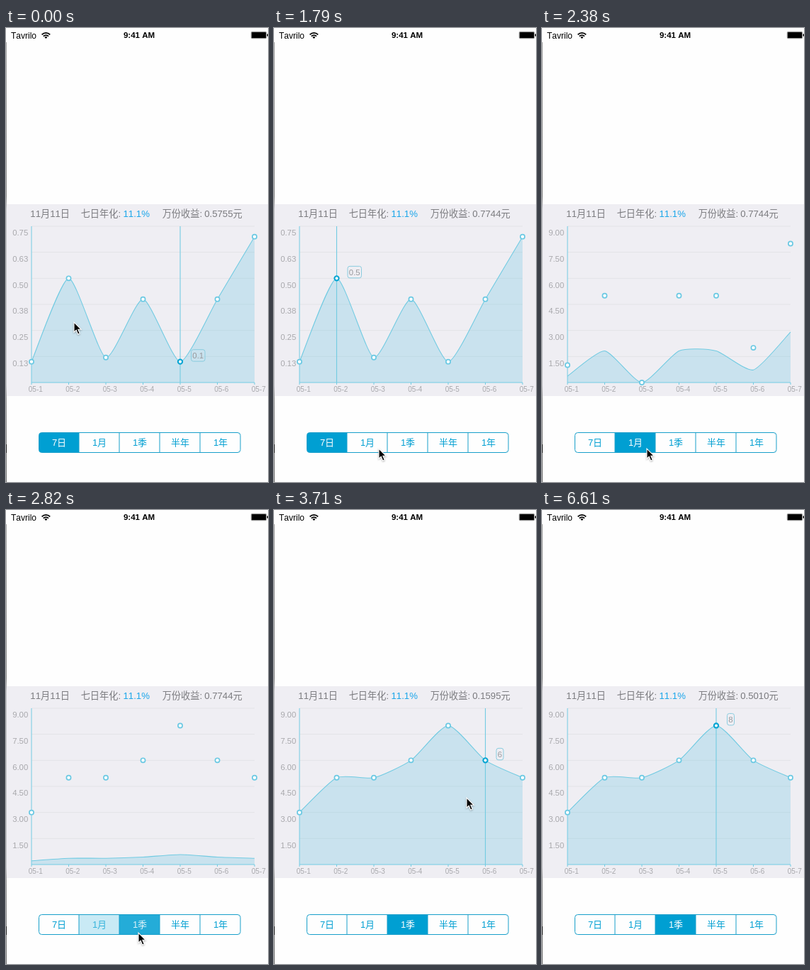
These frames come from a looping animation (370 by 639 pixels, 6670 ms). An HTML page:

```html
<!DOCTYPE html>
<html lang="zh">
<head>
<meta charset="utf-8">
<title>Yield chart</title>
<style>
  html, body { margin: 0; width: 100%; height: 100%; overflow: hidden; background: #fefefe; }
  svg { display: block; width: 370px; height: 639px; }
  text { font-family: "Liberation Sans", "Noto Sans CJK SC", "Noto Sans CJK", sans-serif; font-kerning: none; }
  .head { font-size: 13.2px; fill: #7b7b7f; }
  .head .rate { fill: #1ba6ea; }
  .ylab { font-size: 11.4px; fill: #a9a9ad; text-anchor: end; }
  .xlab { font-size: 10px; fill: #a9a9ad; }
  .seg { font-size: 13px; text-anchor: middle; }
  .grid { stroke: #e3e3e7; }
  .line { stroke: #72cbe2; fill: none; }
  .area { fill: rgba(103, 195, 222, .28); }
  .dot { fill: #fff; stroke: #6bc9e3; stroke-width: 1.7; }
  .dot.on { stroke: #08a5d3; stroke-width: 2.1; }
  .tip rect { fill: none; stroke: #8accdf; }
  .tip text { font-size: 11.4px; fill: #98989c; text-anchor: middle; }
  .cursor { fill: #000; stroke: #fff; stroke-width: 1.1; filter: drop-shadow(0 1px 1px rgba(0, 0, 0, .3)); }
</style>
</head>
<body>
<svg viewBox="0 0 370 639">
  <defs>
    <linearGradient id="edge" x1="0" y1="0" x2="0" y2="1">
      <stop offset="0" stop-color="#a8a8a8"/>
      <stop offset=".35" stop-color="#8c8c8c"/>
      <stop offset=".38" stop-color="#c4c4c8"/>
      <stop offset=".78" stop-color="#c4c4c8"/>
      <stop offset=".81" stop-color="#999"/>
      <stop offset="1" stop-color="#777"/>
    </linearGradient>
  </defs>

  <text x="7" y="14.6" font-size="12">Tavrilo</text>
  <g fill="none" stroke="#000" stroke-width="1.8">
    <path d="M50.6 9.3a8.2 8.2 0 0 1 11.6 0M52.8 11.6a5 5 0 0 1 7.2 0"/>
    <path d="M56.4 14.9l-2-2a2.8 2.8 0 0 1 4 0z" fill="#000" stroke="none"/>
  </g>
  <text x="188" y="14.4" font-size="11.5" font-weight="bold" text-anchor="middle">9:41 AM</text>
  <rect x="346.3" y="5.3" width="21.4" height="9.4" rx="1.5" fill="none" stroke="#000" stroke-width=".5"/>
  <rect x="347" y="6" width="20" height="8" rx=".6"/>
  <rect x="368.6" y="8.3" width="1.4" height="3.4" rx=".6"/>

  <rect y="248" width="370" height="270" fill="#efeef3"/>
  <rect y="20" width="1" height="619" fill="url(#edge)"/>
  <rect y="586" width="1" height="12" fill="#222"/>
  <g class="head">
    <text x="34.3" y="265.7">11月11日</text>
    <text x="105.7" y="265.7">七日年化:</text>
    <text class="rate" x="165.5" y="265.7">11.1%</text>
    <text x="220.7" y="265.7">万份收益:</text>
    <text id="gain" x="280.2" y="265.7"></text>
  </g>

  <g id="axes"></g>
  <path id="area" class="area"/>
  <path id="curve" class="line" stroke-width="1.1"/>
  <path class="line" d="M36 279V499M36 499H351"/>
  <path id="mark" class="line" stroke-width="1.1"/>
  <g id="dots"></g>
  <g id="tip" class="tip"><rect height="16.5" rx="3"/><text></text></g>

  <g id="segs"></g>
  <path d="M103 569.5v28M160 569.5v28M217 569.5v28M274 569.5v28" stroke="#189fca"/>
  <rect x="46.5" y="569.5" width="284.5" height="28" rx="4" fill="none" stroke="#189fca"/>

  <path id="cursor" class="cursor" d="M0 0V14.2L3.2 11.2L5.6 17L8.2 15.9L5.8 10.3H10.2Z"/>
</svg>
<script>
const LOOP = 6670, GROW = 1000, FADE = 300;
const TICKS = [0, 150, 1040, 1190, 1340, 1490, 1640, 1790, 1940, 2090, 2240, 2390, 2530, 2680,
  2820, 2970, 3120, 3270, 3420, 3560, 3710, 4160, 4310, 4450, 4750, 4900, 5050, 5200];
const SERIES = [
  { from: -2000, max: .75, vals: [.1, .5, .12, .4, .1, .4, .7] },
  { from: 1820, max: 9, vals: [1, 5, 0, 5, 5, 2, 8] },
  { from: 2632, max: 9, vals: [3, 5, 5, 6, 8, 6, 5] }
];
const PICKS = [[0, 4], [150, 1], [1820, -1], [3710, 5], [4450, 4]];
const GAINS = [[0, '0.5755'], [150, '0.7744'], [3710, '0.1595'], [4450, '0.5010']];
const PATH = [[0, 96, 414], [890, 96, 414], [1040, 169, 620], [1340, 167, 617], [1790, 148, 592],
  [2240, 148, 592], [2620, 187, 595], [3270, 187, 595], [3560, 272, 405], [4020, 272, 405],
  [4310, 234, 411], [4600, 234, 411], [5200, 276, 650]];
const LEFT = 36, STEP = 52.5, BASE = 499, HIGH = 220, TENSION = .1;

const $ = id => document.getElementById(id);
function add(parent, tag, attrs, text) {
  const el = document.createElementNS('http://www.w3.org/2000/svg', tag);
  set(el, attrs);
  if (text) el.textContent = text;
  parent.appendChild(el);
  return el;
}
function set(el, attrs) {
  for (const k in attrs) el.setAttribute(k, attrs[k]);
}
const latest = (list, t) => list.filter(e => e[0] <= t).pop()[1];
const xAt = i => LEFT + STEP * i;

const yLabels = [], dots = [], segs = [];
for (let i = 0; i < 6; i++) {
  const y = 279 + i * HIGH / 6;
  add($('axes'), 'path', { class: 'grid', d: `M36 ${y}H351` });
  yLabels.push(add($('axes'), 'text', { class: 'ylab', x: 31.3, y: y + 13.2 }));
}
for (let i = 0; i < 7; i++) {
  add($('axes'), 'path', { class: 'line', d: `M${xAt(i)} 499v3` });
  add($('axes'), 'text', { class: 'xlab', x: xAt(i) - 4.2, y: 511.7 }, '05-' + (i + 1));
  dots.push(add($('dots'), 'circle', { cx: xAt(i), r: 3.1 }));
}
['7日', '1月', '1季', '半年', '1年'].forEach((name, i) => {
  const l = 46 + 57 * i, r = l + 57;
  const d = i ? `M${l} 569.5H${r}V597.5H${l}Z`
    : `M${r} 569.5H50.5a4 4 0 0 0 -4 4V593.5a4 4 0 0 0 4 4H${r}Z`;
  segs.push({
    back: add($('segs'), 'path', { d, fill: '#009fd2' }),
    label: add($('segs'), 'text', { class: 'seg', x: 75 + 57 * i, y: 588.3 }, name)
  });
});

// cubic-bezier(.42, 0, .58, 1)
function ease(u) {
  if (u >= 1) return 1;
  let lo = 0, hi = 1, s = .5;
  for (let k = 0; k < 24; k++) {
    s = (lo + hi) / 2;
    const x = 3 * s * (1 - s) * ((1 - s) * .42 + s * .58) + s ** 3;
    if (x < u) lo = s; else hi = s;
  }
  return s * s * (3 - 2 * s);
}

// Cardinal spline as cubic segments
function spline(ys) {
  const p = i => { const k = Math.max(0, Math.min(6, i)); return [xAt(k), ys[k]]; };
  let d = `M${p(0)}`;
  for (let i = 0; i < 6; i++) {
    const [a, b, c, e] = [p(i - 1), p(i), p(i + 1), p(i + 2)];
    d += `C${b.map((v, k) => v + (c[k] - a[k]) * TENSION)} ${c.map((v, k) => v - (e[k] - b[k]) * TENSION)} ${c}`;
  }
  return d;
}

function cursorAt(t) {
  const i = Math.max(1, PATH.findIndex(p => p[0] >= t));
  const a = PATH[i - 1], b = PATH[i], u = (t - a[0]) / (b[0] - a[0]);
  return [a[1] + (b[1] - a[1]) * u, a[2] + (b[2] - a[2]) * u];
}

function drawChart(t, cur) {
  const { from, max, vals } = SERIES[cur];
  const yOf = v => BASE - v / max * HIGH;
  const k = ease((t - from) / GROW);
  const d = spline(vals.map(v => yOf(v * k)));
  set($('curve'), { d });
  set($('area'), { d: d + 'V499H36Z' });
  yLabels.forEach((el, i) => {
    el.textContent = (Math.round(max * (6 - i) / 6 * 100 + 1e-6) / 100).toFixed(2);
  });

  const pick = latest(PICKS, t);
  dots.forEach((el, i) => set(el, { cy: yOf(vals[i]), class: i === pick ? 'dot on' : 'dot' }));
  const show = pick < 0 ? 'none' : 'inline';
  set($('mark'), { display: show, d: `M${xAt(Math.max(0, pick))} 279V499` });
  set($('tip'), { display: show });
  if (pick >= 0) {
    const text = String(vals[pick]), w = text.length > 1 ? 19.5 : 10;
    const x = xAt(pick) + 15.5, y = yOf(vals[pick]) - 17;
    const [box, label] = $('tip').children;
    set(box, { x, y, width: w });
    set(label, { x: x + w / 2, y: y + 12.4 });
    label.textContent = text;
  }
  $('gain').textContent = latest(GAINS, t) + '元';
}

function drawSegs(t, cur) {
  const u = Math.min(1, (t - SERIES[cur].from) / FADE);
  segs.forEach(({ back, label }, i) => {
    const a = i === cur ? 1 - (1 - u) ** 2 : i === cur - 1 ? (1 - u) ** 1.6 : 0;
    set(back, { 'fill-opacity': a });
    set(label, { fill: `rgb(${255 * a},${159 + 96 * a},${210 + 45 * a})` });
  });
}

function frame() {
  const now = performance.now() % LOOP;
  const t = TICKS.filter(v => v <= now).pop();
  const cur = SERIES.filter(s => s.from <= t).length - 1;
  drawChart(t, cur);
  drawSegs(t, cur);
  set($('cursor'), t < 5200
    ? { display: 'inline', transform: `translate(${cursorAt(t)})` }
    : { display: 'none' });
  requestAnimationFrame(frame);
}
frame();
</script>
</body>
</html>
```
